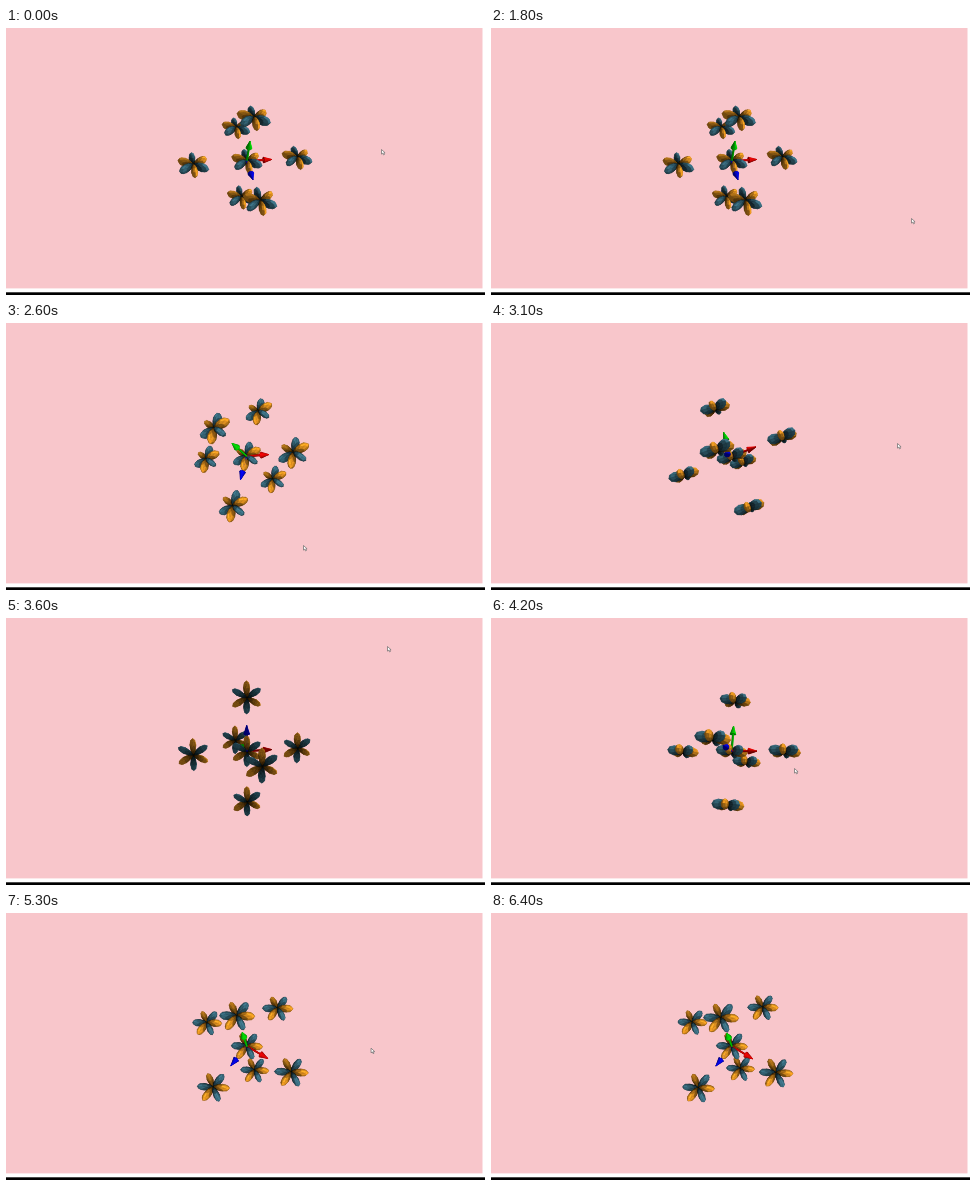
Animation of 479x267 px, one loop 6.5 s. Source, as an HTML page with a canvas:

```html
<!DOCTYPE html>
<html lang="en">
<head>
<meta charset="utf-8">
<title>Rotating orbitals</title>
<style>
  html, body { margin: 0; width: 100%; height: 100%; overflow: hidden; background: #f8c6cb; }
  canvas { display: block; width: 479px; height: 267px; }
</style>
</head>
<body>
<canvas></canvas>
<script>
const WIDTH = 479, HEIGHT = 267, LOOP = 6500, STEP = 100;
const CENTER = { x: 240.8, y: 133.2 }, SPACING = 53.5, CAMERA = 400;
const LOBE = 16;
const ORANGE = [275, 178, 40], TEAL = [74, 138, 162];
const LIGHT = [0.61, 0.77, 0.2];

const canvas = document.querySelector('canvas');
const ctx = canvas.getContext('2d');
const density = window.devicePixelRatio || 1;
canvas.width = WIDTH * density;
canvas.height = HEIGHT * density;

const { sin, cos, PI } = Math;
const dot = (a, b) => a.reduce((sum, v, i) => sum + v * b[i], 0);
const sub = (a, b) => a.map((v, i) => v - b[i]);
const lerp = (a, b, k) => a.map((v, i) => v + (b[i] - v) * k);
const unit = a => {
  const length = Math.hypot(...a) || 1;
  return a.map(v => v / length);
};
const cross = (a, b) => a.map((_, i) => {
  const j = (i + 1) % 3, k = (i + 2) % 3;
  return a[j] * b[k] - a[k] * b[j];
});

// Quads of a parametric surface, lit by a light fixed to the scene
function surface(rows, columns, point, color) {
  const quads = [];
  for (let i = 0; i < rows; i++) {
    for (let j = 0; j < columns; j++) {
      const points = [point(i, j), point(i + 1, j), point(i + 1, j + 1), point(i, j + 1)];
      const [a, b, c, d] = points;
      const normal = unit(cross(sub(c, a), sub(d, b)));
      const shade = 0.42 + 0.58 * Math.max(0, dot(normal, LIGHT));
      const rgb = color(i + 0.5, j + 0.5).map(v => Math.min(255, Math.round(v * shade)));
      quads.push({ points, fill: `rgb(${rgb})` });
    }
  }
  return quads;
}

// Six-lobed orbital, r ~ |sin^3(theta) cos(3 phi)|, darkening to its centre
function makeOrbital() {
  const rows = 14, columns = 48;
  const angles = (i, j) => [PI * i / rows, 2 * PI * j / columns];
  const wave = (theta, phi) => sin(theta) ** 3 * cos(3 * phi);
  return surface(rows, columns, (i, j) => {
    const [theta, phi] = angles(i, j);
    const r = LOBE * Math.abs(wave(theta, phi)) ** 1.15;
    return [r * sin(theta) * sin(phi), r * cos(theta), r * sin(theta) * cos(phi)];
  }, (i, j) => {
    const value = wave(...angles(i, j));
    const dim = Math.min(1, 0.08 + 1.1 * Math.abs(value));
    return (value > 0 ? ORANGE : TEAL).map(v => v * dim);
  });
}

function makeArrow(axis) {
  const length = 26, neck = 17.5, headRadius = 2.9, shaftRadius = 0.5;
  const profile = [[length, 0], [neck, headRadius], [neck, shaftRadius], [0, shaftRadius]];
  const columns = 12;
  const color = [0, 1, 2].map(i => i === axis ? 255 : 5);
  return surface(profile.length - 1, columns, (i, j) => {
    const [along, radius] = profile[i];
    const phi = 2 * PI * j / columns;
    const p = [];
    p[axis] = along;
    p[(axis + 1) % 3] = radius * cos(phi);
    p[(axis + 2) % 3] = radius * sin(phi);
    return p;
  }, () => color);
}

const axes = [0, 1, 2];
const orbital = makeOrbital();
const arrows = axes.flatMap(makeArrow);
const sites = [[0, 0, 0], ...axes.flatMap(axis =>
  [-SPACING, SPACING].map(d => axes.map(i => i === axis ? d : 0)))];

// Quaternions [x, y, z, w]
function multiply(a, b) {
  const c = cross(a.slice(0, 3), b.slice(0, 3));
  return [...c.map((v, i) => v + a[3] * b[i] + b[3] * a[i]),
    a[3] * b[3] - dot(a.slice(0, 3), b)];
}
function spin(axis, degrees) {
  const half = degrees * PI / 360;
  const q = [0, 0, 0, cos(half)];
  q[axis] = sin(half);
  return q;
}
const pose = (yaw, pitch, roll) =>
  multiply(spin(2, roll), multiply(spin(0, pitch), spin(1, yaw)));

function slerp(a, b, k) {
  const angle = Math.acos(Math.min(1, dot(a, b)));
  if (angle < 1e-4) return a;
  const p = sin((1 - k) * angle) / sin(angle);
  const q = sin(k * angle) / sin(angle);
  return a.map((v, i) => v * p + b[i] * q);
}

function rotator(q) {
  const axis = q.slice(0, 3);
  return p => {
    const twist = cross(axis, p).map(v => 2 * v);
    const turn = cross(axis, twist);
    return p.map((v, i) => v + q[3] * twist[i] + turn[i]);
  };
}

const easeOut = k => 1 - (1 - k) ** 2;
const poses = [
  { at: 1850, value: pose(19, 42, -9) },
  { at: 2600, value: pose(-55, 44, 49) },
  { at: 3600, value: pose(44, -70, 46) },
  { at: 4200, value: pose(-19, -12, -4) },
  { at: 4800, value: pose(-39, 46, 5) },
  { at: 5600, value: pose(-56, 60, 21), ease: easeOut }];

// Turning points of the dragging pointer
const pointerEnd = 5600;
const pointerPath = [
  { at: 0, value: [375, 121] },
  { at: 700, value: [468, 176] },
  { at: 1800, value: [420, 190] },
  { at: 2300, value: [330, 228] },
  { at: 2600, value: [297, 222] },
  { at: 3100, value: [406, 120] },
  { at: 3600, value: [381, 28] },
  { at: 4200, value: [303, 150] },
  { at: 4900, value: [236, 245] },
  { at: pointerEnd, value: [461, 52] }];

function sample(keys, t, mix) {
  const next = keys.findIndex(key => key.at > t);
  if (next < 0) return keys[keys.length - 1].value;
  if (next === 0) return keys[0].value;
  const from = keys[next - 1], to = keys[next];
  const k = (t - from.at) / (to.at - from.at);
  return mix(from.value, to.value, to.ease ? to.ease(k) : k);
}

function drawScene(rotate) {
  const faces = [];
  const turn = quads => quads.map(q => ({ points: q.points.map(rotate), fill: q.fill }));
  const addMesh = (quads, offset) => {
    for (const { points, fill } of quads) {
      const placed = points.map(p => p.map((v, i) => v + offset[i]));
      faces.push({ placed, fill, depth: placed.reduce((sum, p) => sum + p[2], 0) });
    }
  };
  const turned = turn(orbital);
  for (const site of sites) addMesh(turned, rotate(site));
  addMesh(turn(arrows), [0, 0, 0]);
  faces.sort((a, b) => a.depth - b.depth);

  ctx.lineWidth = 0.25;
  ctx.lineJoin = 'round';
  for (const { placed, fill } of faces) {
    ctx.beginPath();
    for (const [x, y, z] of placed) {
      const scale = CAMERA / (CAMERA - z);
      ctx.lineTo(CENTER.x + x * scale, CENTER.y - y * scale);
    }
    ctx.closePath();
    ctx.fillStyle = ctx.strokeStyle = fill;
    ctx.fill();
    ctx.stroke();
  }
}

const pointerShape = new Path2D('M0 0V4.6L1.2 3.7L2 5.4L2.9 5L2.2 3.4L3.6 3.3Z');
function drawPointer([x, y]) {
  ctx.save();
  ctx.translate(x + 0.5, y + 0.5);
  ctx.lineWidth = 0.7;
  ctx.fillStyle = '#fff';
  ctx.strokeStyle = '#666';
  ctx.fill(pointerShape);
  ctx.stroke(pointerShape);
  ctx.restore();
}

function draw(t) {
  ctx.setTransform(density, 0, 0, density, 0, 0);
  ctx.fillStyle = '#fff';
  ctx.fillRect(0, 0, WIDTH, HEIGHT);
  ctx.fillStyle = '#f8c6cb';
  ctx.fillRect(0, 0, 476.5, 260.4);
  drawScene(rotator(sample(poses, t, slerp)));
  ctx.fillStyle = '#000';
  ctx.fillRect(0, 264.3, WIDTH, 3);
  if (t <= pointerEnd) drawPointer(sample(pointerPath, t, lerp));
}

const origin = performance.now();
let shown = -1;
function tick() {
  const t = Math.floor((performance.now() - origin) % LOOP / STEP) * STEP;
  if (t !== shown) draw(shown = t);
  requestAnimationFrame(tick);
}
tick();
</script>
</body>
</html>
```
